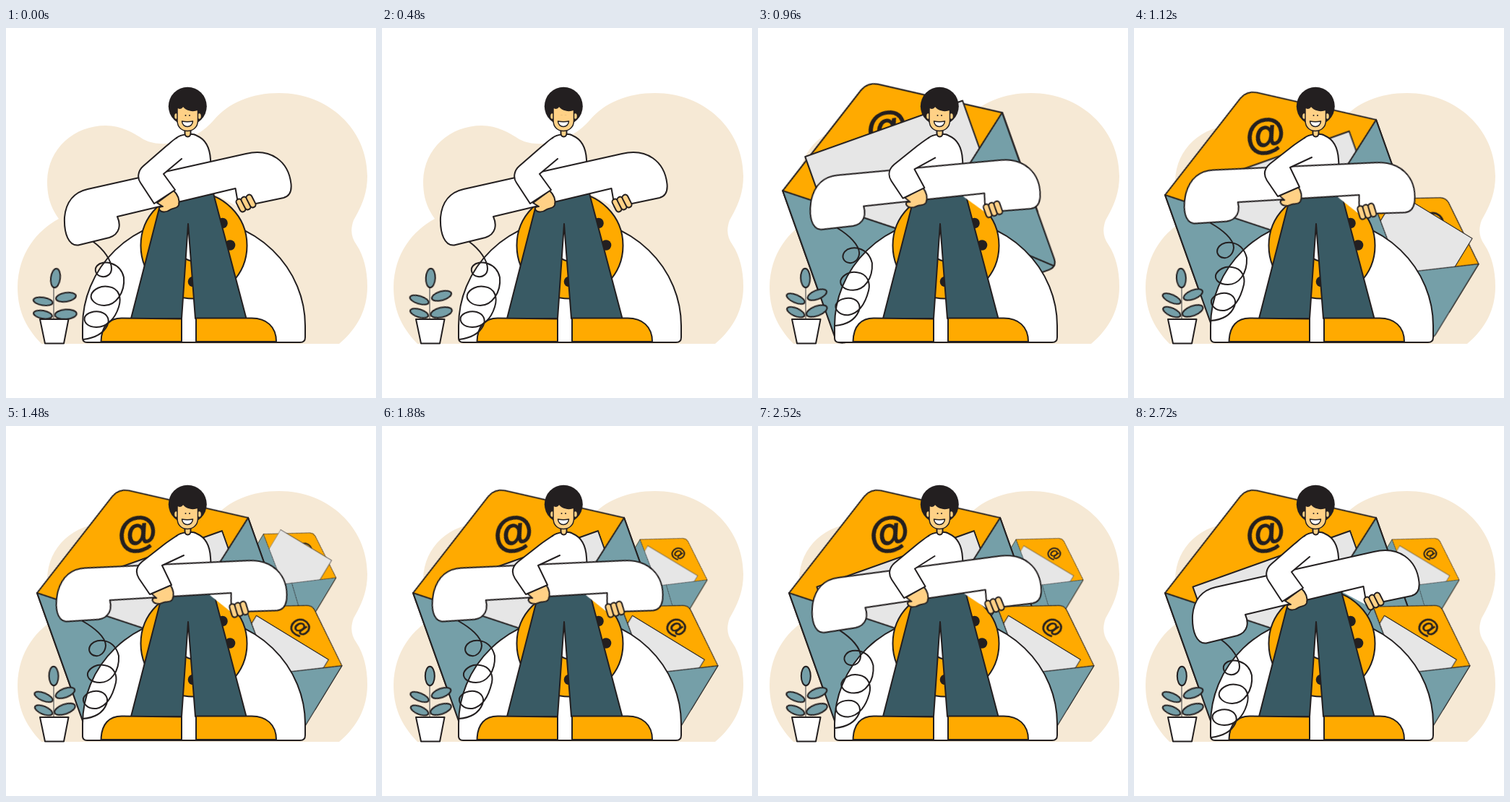
Recreate the animation shown at these times as an HTML page. Size 512x512 px, loop 2.88 s.

```html
<!DOCTYPE html>
<html lang="en">
<head>
<meta charset="utf-8">
<title>Phone and mail</title>
<style>
html, body { margin: 0; width: 100%; height: 100%; overflow: hidden; background: #fff; }
svg { display: block; width: 100%; height: 100%; }
.ink { stroke: #231f20; stroke-width: 2; stroke-linejoin: round; stroke-linecap: round; }
.dark { fill: #231f20; }
.white { fill: #fff; }
.orange { fill: #fa0; }
.teal { fill: #759fa8; }
.skin { fill: #ffd186; }
.none { fill: none; }
.at { font: bold 57px "Liberation Sans", Arial, sans-serif; text-anchor: middle; stroke-width: 1.2; }

.move { animation: 2.88s cubic-bezier(.37, 0, .63, 1) infinite; }
.env { transform-origin: 160px 212px; }
.letter { transform-origin: 155px 5px; }
.e1 { animation-name: env1; }
.e2 { animation-name: env2; }
.e3 { animation-name: env3; }
.l1 { animation-name: letter1; }
.l2 { animation-name: letter2; }
.l3 { animation-name: letter3; }

/* grow past full size, then settle */
@keyframes env1 {
  0%, 18.92% { transform: scale(0); }
  27.78% { transform: scale(1.104); }
  37.5%, 100% { transform: scale(1); }
}
@keyframes env2 {
  0%, 29.17% { transform: scale(0); }
  38.89% { transform: scale(1.1); }
  48.61%, 100% { transform: scale(1); }
}
@keyframes env3 {
  0%, 38.89% { transform: scale(0); }
  48.61% { transform: scale(1.1); }
  58.33%, 100% { transform: scale(1); }
}
@keyframes letter1 {
  0%, 25% { transform: translateY(140px); }
  31.94% { transform: translateY(-40.5px) scale(.96); }
  40.28%, 100% { transform: none; }
}
@keyframes letter2 {
  0%, 32.64% { transform: translateY(140px); }
  39.58% { transform: translateY(-55px) scale(.94); }
  47.92%, 100% { transform: none; }
}
@keyframes letter3 {
  0%, 43.06% { transform: translateY(140px); }
  50% { transform: translateY(-55px) scale(.94); }
  58.33%, 100% { transform: none; }
}

.phone { transform-origin: 263px 192.5px; animation-name: tilt; }
@keyframes tilt {
  0%, 23.6% { transform: rotate(0deg); }
  38.6%, 80.6% { transform: rotate(10deg); }
  94.44%, 100% { transform: rotate(0deg); }
}
.arm { animation-name: arm; }
@keyframes arm {
  0%, 23.6%, 94.44%, 100% {
    d: path("M236 152 C231 155 225 161 221 164 L190 191 C183 197 181 207 186 214 L205 243 L234 224 L218 202 L243 181");
  }
  38.6%, 80.6% {
    d: path("M236 152 C230 156 224 160 220 163 L188 188 C180 195 179 203 184 211 L199 233 L229 220 L216 193 L246 179");
  }
}
.coil { animation-name: coil; }
@keyframes coil {
  0%, 23.6%, 94.44%, 100% {
    d: path("M121 296 C136 307 146 322 146 333 C146 341 139 345 133 344 C125 343 121 335 126 329 C134 320 158 324 163 345 C165 366 152 384 136 384 C124 384 116 376 118 369 C121 361 132 356 142 358 C157 360 160 374 156 386 C151 402 140 414 125 414 C113 414 107 407 109 400 C112 394 122 391 131 393 C141 396 144 404 140 412 C134 424 122 429 107 431");
  }
  38.6%, 80.6% {
    d: path("M106 270 C122 279 138 292 138 304 C137 314 130 319 124 318 C116 317 112 309 118 302 C126 293 150 294 156 318 C157 340 145 355 130 355 C118 355 112 349 113 342 C116 334 126 329 136 331 C150 333 154 345 152 355 C148 372 140 388 125 391 C113 392 106 384 107 377 C110 369 120 366 128 367 C139 369 142 378 139 385 C134 397 122 404 106 405");
  }
}

.leaf { animation-name: sway; }
@keyframes sway {
  0%, 6.94% { transform: rotate(var(--droop)); }
  24% { transform: rotate(0deg); }
  38% { transform: rotate(var(--lift)); }
  60%, 100% { transform: rotate(0deg); }
}
.eyes { transform-origin: 251px 121px; animation-name: blink; }
@keyframes blink {
  0%, 15%, 19.5%, 72%, 76.5%, 100% { transform: scaleY(1); }
  17%, 74% { transform: scaleY(.1); }
}
</style>
</head>
<body>
<svg viewBox="0 0 512 512">
  <defs>
    <clipPath id="inside"><rect x="-40" y="-200" width="390" height="410"/></clipPath>
    <g id="back" class="ink">
      <path class="orange" d="M0 0 L143 -91 Q155 -98 167 -91 L310 0 V140 H0 Z"/>
      <text class="at dark" transform="translate(158 -29) rotate(10)" y="15">@</text>
    </g>
    <rect id="sheet" class="ink" x="39" y="5" width="231" height="230" fill="#e6e6e6"/>
    <g id="pocket" class="ink">
      <path class="teal" d="M0 0 L155 121 L310 0 V206 Q310 218 298 218 H12 Q0 218 0 206 Z"/>
      <path class="none" d="M181 100 L306 215 M129 100 L4 215"/>
    </g>
    <rect id="finger" class="ink skin" x="-4" y="-9.5" width="8" height="19" rx="4"/>
  </defs>

  <path fill="#f6e9d5" d="M49 437 C25 412 16 388 16 358 C17 312 42 281 73 264 C60 246 57 230 57 212 C58 166 95 135 138 135 C160 135 176 145 190 154 C204 161 218 161 232 159 C262 152 275 141 287 128 C308 103 340 90 378 90 C446 90 500 140 500 205 C500 232 490 250 481 266 C476 280 478 290 485 300 C495 315 500 335 500 358 C500 390 486 416 461 437 Z"/>

  <g transform="translate(357 157) rotate(31) scale(.35)">
    <g class="move env e3">
      <use href="#back"/>
      <g clip-path="url(#inside)"><use href="#sheet" class="move letter l3"/></g>
      <use href="#pocket"/>
    </g>
  </g>
  <g transform="translate(43 231) rotate(-19.6)">
    <g class="move env e1">
      <use href="#back"/>
      <g clip-path="url(#inside)"><use href="#sheet" class="move letter l1"/></g>
      <use href="#pocket"/>
    </g>
  </g>
  <g transform="translate(331 250) rotate(31.4) scale(.506)">
    <g class="move env e2">
      <use href="#back"/>
      <g clip-path="url(#inside)"><use href="#sheet" class="move letter l2"/></g>
      <use href="#pocket"/>
    </g>
  </g>

  <!-- plant -->
  <path d="M66 403 V358" stroke="#555" stroke-width="1.2"/>
  <g class="ink teal">
    <g class="move leaf" style="--droop: 7deg; --lift: -3deg; transform-origin: 66px 364px">
      <ellipse cx="66.3" cy="346" rx="6.5" ry="13.3"/>
    </g>
    <g class="move leaf" style="--droop: -13deg; --lift: 2deg; transform-origin: 66px 380px">
      <ellipse cx="52" cy="375" rx="13.5" ry="5.5" transform="rotate(22 52 375)"/>
    </g>
    <g class="move leaf" style="--droop: -12deg; --lift: 2deg; transform-origin: 66px 400px">
      <ellipse cx="52" cy="393.5" rx="13" ry="5.5" transform="rotate(22 52 393.5)"/>
    </g>
    <g class="move leaf" style="--droop: 11deg; --lift: -2deg; transform-origin: 67px 376px">
      <ellipse cx="82" cy="369.5" rx="14" ry="6.3" transform="rotate(-20 82 369.5)"/>
    </g>
    <g class="move leaf" style="--droop: 15deg; --lift: -2deg; transform-origin: 66px 399px">
      <ellipse cx="81.5" cy="392" rx="15" ry="6.7" transform="rotate(-19 81.5 392)"/>
    </g>
  </g>
  <path class="ink white" d="M47 403 H86.500 L80 436.500 H54 Z"/>

  <!-- telephone -->
  <g class="ink">
    <path class="white" d="M106 412 A154 148 0 0 1 414 412 V428 Q414 435 407 435 H112 Q106 435 106 429 Z"/>
    <circle class="orange" cx="260" cy="301" r="73.500"/>
    <circle class="white" cx="260" cy="301" r="21.500"/>
  </g>
  <g class="dark">
    <circle cx="299.500" cy="270" r="7.300"/>
    <circle cx="310" cy="300.500" r="7.300"/>
    <circle cx="259" cy="351" r="7.300"/>
  </g>

  <!-- legs and shoes -->
  <g class="ink">
    <path fill="#395a64" d="M217 230 L173 402 H243 L252 271 L262 402 H332.500 L287 229 Z"/>
    <path class="orange" d="M131.500 434 C132 412 143 401.500 160 401.500 L243 402.500 V434 Z M263 401.500 H340 C360 401.500 374 413 374 434 H263 Z"/>
  </g>
  <path class="ink none move coil" d="M121 296"/>

  <!-- torso and head -->
  <path class="ink white" d="M236 152 C242 147 258 145 264 149 C276 154 282 165 283 182 L286 228 H215 L218 200 Z"/>
  <path class="ink skin" d="M247.500 139 V146 C248 152 255 152 255.500 146 V139 Z"/>
  <circle class="dark" cx="251.300" cy="108.300" r="26.500"/>
  <g class="skin ink" style="stroke-width: 1.5">
    <ellipse cx="235.500" cy="122" rx="3" ry="4.500"/>
    <ellipse cx="267.500" cy="122" rx="3" ry="4.500"/>
    <path d="M237 110 V128 C237 138 244 142.500 251 142.500 S265.500 138 265.500 128 V113 C258 116 250 114 245 108 C243 111 240 112 237 110 Z"/>
  </g>
  <g class="dark move eyes">
    <circle cx="248.500" cy="121" r="1"/>
    <circle cx="254" cy="121" r="1"/>
  </g>
  <path class="ink white" style="stroke-width: 1.5" d="M243.500 129 Q251 130.500 258.500 129 C258 139 244 139 243.500 129 Z"/>

  <!-- handset with both hands -->
  <g class="move phone">
    <path class="white" d="M317.500 222 L322 248 L287 229 Z"/>
    <path class="ink white" d="M113 223 L332 174 C366 166 391 184 394.500 216 C395.500 227 392 233 384 235 L322 248 L317.500 222 L154 261 C159 272 158 285 143 290 L100 300.500 C87 302 80 285 81 262 C83 240 95 227 113 223 Z"/>
    <path class="ink skin" d="M209 242 L232 225 C238 231 241 237 239 245 C237 250 231 249 228 251 C223 255 215 256 212 251 C211 248 214 247 217 247 Z"/>
    <use href="#finger" transform="translate(325 245.500) rotate(-27)"/>
    <use href="#finger" transform="translate(332 242.500) rotate(-27)"/>
    <use href="#finger" transform="translate(339 239.500) rotate(-27)"/>
  </g>
  <path class="ink white move arm" d="M236 152"/>
</svg>
</body>
</html>
```
